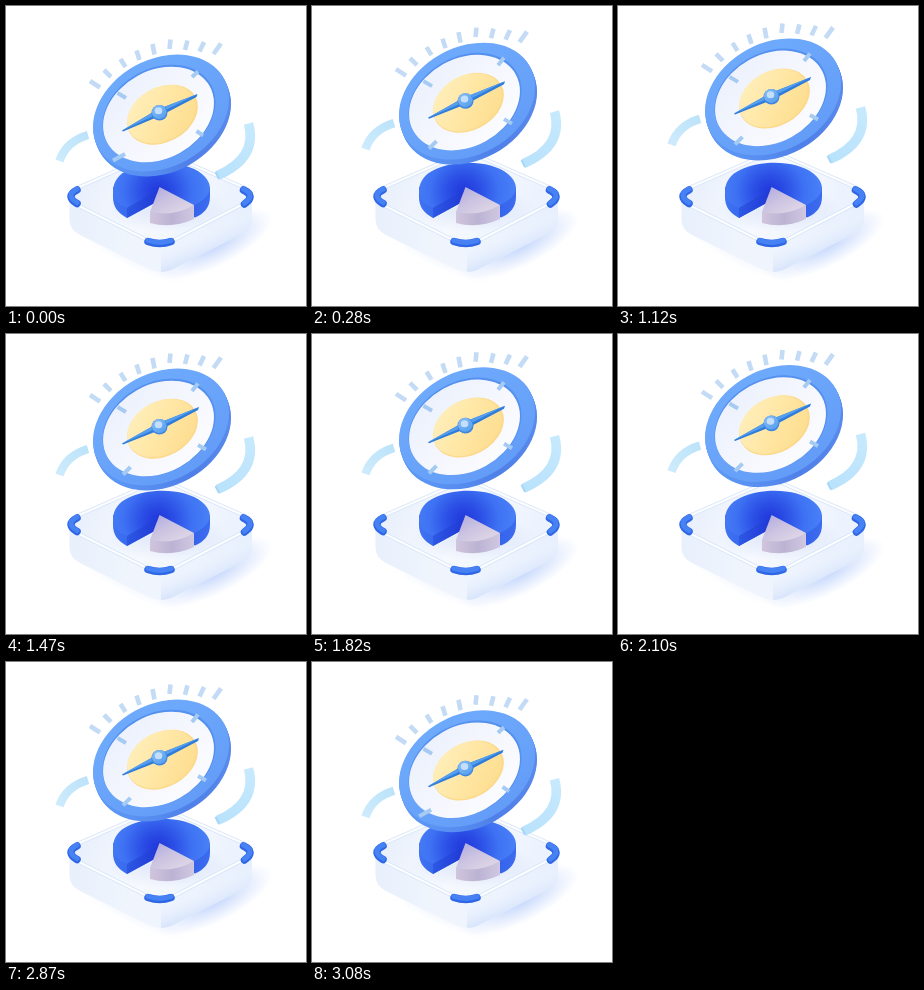
These frames come from a looping animation (300x300 px, 3150 ms). An HTML page with a canvas:

```html
<!DOCTYPE html>
<html lang="en">
<head>
<meta charset="utf-8">
<title>Floating dial</title>
<style>
html, body { margin: 0; width: 100%; height: 100%; overflow: hidden; background: #fff; }
canvas { display: block; width: 300px; height: 300px; }
</style>
</head>
<body>
<canvas id="stage"></canvas>
<script>
const LOOP = 3150, STEP = 70, TILT = -0.503;
const canvas = document.getElementById('stage');
const ctx = canvas.getContext('2d');
const dpr = window.devicePixelRatio || 1;
canvas.width = canvas.height = 300 * dpr;

const ease = p => (1 - Math.cos(Math.PI * Math.min(1, Math.max(0, p)))) / 2;
const mix = (a, b, k) => a + (b - a) * k;

// Height of the dial above its resting place.
function liftAt(t) {
  const up = ease(t / 500), down = ease((t - 2660) / 450);
  const dip = t < 1500 ? ease((t - 560) / 940) : 1 - ease((t - 1500) / 1100);
  return (20 - 6 * dip) * up * (1 - down);
}

function addStops(g, colors) {
  colors.forEach((c, i) => g.addColorStop(i / (colors.length - 1), c));
  return g;
}

const linear = (x0, y0, x1, y1, ...colors) =>
  addStops(ctx.createLinearGradient(x0, y0, x1, y1), colors);
const radial = (x, y, r, ...colors) =>
  addStops(ctx.createRadialGradient(x, y, 0, x, y, r), colors);

function fill(d, style) {
  ctx.fillStyle = style;
  ctx.fill(new Path2D(d));
}

function stroke(d, style, width, cap = 'round') {
  ctx.strokeStyle = style;
  ctx.lineWidth = width;
  ctx.lineCap = cap;
  ctx.lineJoin = 'round';
  ctx.stroke(new Path2D(d));
}

function oval(x, y, a, b, style, turn = TILT) {
  ctx.beginPath();
  ctx.ellipse(x, y, a, b, turn, 0, Math.PI * 2);
  ctx.fillStyle = style;
  ctx.fill();
}

function softSpot(x, y, rx, ry, turn, rgb, alpha) {
  ctx.save();
  ctx.translate(x, y);
  ctx.rotate(turn);
  ctx.scale(rx, ry);
  ctx.fillStyle = radial(0, 0, 1, `rgba(${rgb},${alpha})`, `rgba(${rgb},${alpha / 2})`, `rgba(${rgb},0)`);
  ctx.fillRect(-1, -1, 2, 2);
  ctx.restore();
}

function drawBase() {
  softSpot(207, 238, 66, 23, -0.46, '150,182,250', 0.6);
  softSpot(125, 249, 60, 12, 0.46, '200,215,250', 0.25);
  fill('M63.5 190 V214 Q64 224 74 229 L141 262 Q155 269 169 262 L237 227 Q246 222 246 213 V190 L155 170 Z',
    linear(64, 0, 246, 0, '#e8f0fc', '#f0f5fd', '#eef4fe', '#e3edfc'));
  fill('M155 241 L246 196 V213 Q246 222 237 227 L169 262 Q162 266 155 266 Z',
    linear(188, 214, 202, 248, 'rgba(240,246,255,.2)', 'rgba(236,243,254,.5)', 'rgba(214,227,251,.9)'));

  const top = 'M71 182 L144 150 Q155 145 166 150 L239 182 Q252 189 239 197 L168 234 Q155 241 141 234 L71 199 Q58 190 71 182 Z';
  fill(top, linear(90, 165, 210, 220, '#ebf1fc', '#f6f9fe', '#edf3fe'));
  softSpot(162, 204, 62, 22, 0, '172,190,235', 0.35);
  stroke(top, '#d9e5f8', 4);
  stroke(top, '#fbfdff', 2);
}

function drawClips() {
  const clips = [
    'M71 184 Q59 190 71 197.5',
    'M142 235.500 Q154 239.500 165 235.500',
    'M237.500 184 Q250 190 238.500 198'
  ];
  for (const d of clips) {
    stroke(d, '#2f66e5', 7.5);
    ctx.save();
    ctx.translate(0, -1);
    stroke(d, '#4782f5', 5);
    ctx.restore();
  }
}

function drawPie() {
  fill('M107 181 V191 C107 201 112 207 121 212 L154 194 L189 211.500 C198 208 204 201 204 191 V181 Z',
    linear(107, 0, 204, 0, '#3f74f2', '#2a52e0', '#3c6cf0'));
  fill('M154 182 L121 202 C101 194 104 172 122 164 C145 153 180 155 196 168 C210 180 204 192 188 199 Z',
    radial(152, 186, 52, '#1f35da', '#2c50e6', '#3e72f3', '#4a80f7'));
  fill('M121 202 L154 182 V194 L121 212 Z', linear(121, 0, 152, 0, '#2d58e4', '#2038d6'));

  fill('M144 206 V217 Q166 223 188 213 V199 Z',
    linear(144, 0, 188, 0, '#d0c5dd', '#bcb3d3', '#d0c8e2'));
  fill('M153.500 181 L188 199 Q168 211 144 206 Z',
    linear(153, 181, 168, 208, '#b4addf', '#cbc3e1', '#dcd3e6'));
}

const rays = [
  [84, 75, 94, 81.5], [98, 64, 105, 71], [114.5, 53, 119.5, 61],
  [130.5, 44.5, 133.5, 54], [146.5, 38, 148.5, 48.5], [164.5, 33.5, 163.5, 43],
  [181.5, 34.5, 179, 44], [198, 36, 193.5, 45.5], [215, 37.5, 207.5, 48]
];

function drawAccents() {
  for (const [x0, y0, x1, y1] of rays)
    stroke(`M${x0} ${y0} L${x1} ${y1}`, '#c3dbf4', 4.6, 'butt');
  stroke('M82 129 Q60 135.500 53.500 155', linear(82, 128, 54, 155, '#bce3fa', '#cdebfc'), 8.5, 'butt');
  stroke('M242.500 117.500 Q252 152 211.500 169.500', linear(242, 118, 212, 168, '#c6e9fd', '#b9e2fc'), 9.5, 'butt');
  stroke('M209.500 166 L213 173', '#a5d5f7', 2, 'butt');
}

function drawDial(k) {
  // The rim's side is the face pushed down and to the right.
  const side = linear(100, 150, 222, 80, '#5c97f5', '#4f7fe8', '#5b8cec');
  for (let i = 5; i > 0; i--) oval(155 + i * 0.4, 107 + i, 71.8, 53.8, side);
  oval(155, 107, 71.8, 53.8, linear(120, 55, 190, 160, '#6fabfc', '#69a4fa', '#629bf7'));
  oval(153, 107.5, 59.5, 45, '#5490ef');
  oval(152.5, 108.5, 58.5, 44, linear(110, 70, 200, 145, '#eaf0fc', '#f5f7fe', '#fdfdff'));

  const ticks = [
    [111.5, 87, 120, 92],
    [186, 71, 192, mix(65.5, 63.5, k)],
    [mix(107, 117, k), 154.5, mix(119, 124.5, k), mix(148, 147, k)],
    [mix(190.5, 192, k), 125, mix(197, 200, k), 129.5]
  ];
  for (const [x0, y0, x1, y1] of ticks)
    stroke(`M${x0} ${y0} L${x1} ${y1}`, '#a6cbf3', 4, 'butt');

  oval(156.5, 108.7, 37.5, 27.3, '#fcd98b');
  oval(155.5, 108.2, 36.3, 26.6, linear(125, 92, 190, 122, '#ffefbc', '#ffe6a3', '#fddd8e'));

  const tip = mix(191.5, 193, k), end = mix(88, 87, k);
  const near = mix(124.5, 123.5, k);
  fill(`M116 ${near} L151.500 103.500 L${tip} ${end} L${tip - 1} ${end + 3} L155 109.500 L117 ${near + 1} Z`, '#2f7cda');
  fill(`M116 ${near} L151.500 103.500 L${tip} ${end} L154 107 Z`, '#559fee');
  oval(153.5, 106.8, 8, 7.8, '#3f86e2', 0);
  oval(153.2, 106, 7.3, 7, linear(147, 99, 158, 113, '#87bdf5', '#569fee'), 0);
  oval(152.5, 104.8, 3.8, 3.5, '#c3dffb', 0);
}

function draw(t) {
  const lift = liftAt(t);
  ctx.setTransform(dpr, 0, 0, dpr, 0, 0);
  ctx.fillStyle = '#fff';
  ctx.fillRect(0, 0, 300, 300);
  drawBase();
  drawPie();
  drawClips();
  ctx.translate(0, -lift);
  drawAccents();
  drawDial(Math.min(1, lift / 11));
}

let start;
function tick(now) {
  start ??= now;
  draw(Math.floor((now - start) % LOOP / STEP) * STEP);
  requestAnimationFrame(tick);
}
draw(0);
requestAnimationFrame(tick);
</script>
</body>
</html>
```
